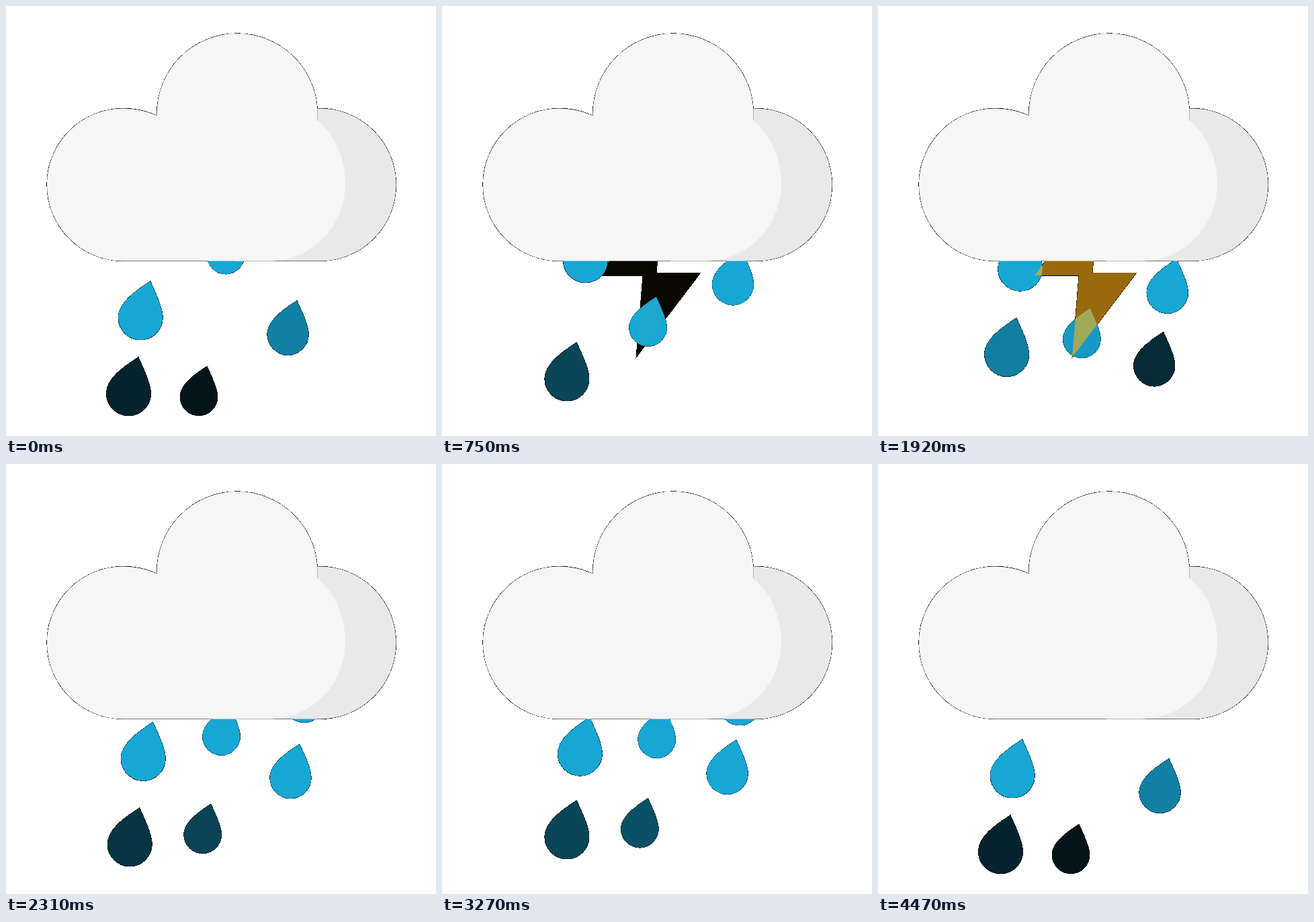
Animation, 640 px wide and 640 px high, one loop 4.5 s. Source, as an HTML page:

```html
<!DOCTYPE html>
<html lang="en">
<head>
<meta charset="utf-8">
<title>Rain cloud</title>
<style>
  html, body { margin: 0; width: 100%; height: 100%; overflow: hidden; background: #fff; }
  svg { display: block; width: 100vw; height: 100vh; }
</style>
</head>
<body>
<svg viewBox="0 0 640 640">
  <defs>
    <path id="drop" d="M14.5-53C22-36 33-14 33 1A33 33 0 0 1-33 1C-33-21-8-38.5 14.5-53Z"/>
    <path id="bolt" d="M280 338L233 401H299L289 523L385 397H319L325 338Z"/>
    <path id="shade" d="M340 379.6H467A113.6 113.6 0 0 0 580.6 266A113.6 113.6 0 0 0 467 152.4H463.4V180L340 300Z"/>
    <path id="light" d="M174.5 152.4A113.6 113.6 0 0 0 60.9 266A113.6 113.6 0 0 0 174.5 379.6H391C455 379.6 505 328 505 264C505 228 490 192 463.4 170V152.4A119.7 119.7 0 0 0 344 40.8A119.7 119.7 0 0 0 224.5 163Q201 152.4 174.5 152.4Z"/>
  </defs>
  <!-- hard black silhouettes show as a hairline around the smooth fills -->
  <g stroke="#000" shape-rendering="crispEdges">
    <use href="#shade"/>
    <use href="#light"/>
    <use id="boltBack" href="#bolt"/>
    <g id="dropBacks"></g>
  </g>
  <g id="dropFills"></g>
  <use id="boltLight" href="#bolt" fill="#ffb217"/>
  <use href="#shade" fill="#e9e9e9"/>
  <use href="#light" fill="#f6f6f6"/>
</svg>
<script>
const STEP = 30, STEPS = 150;
const $ = id => document.getElementById(id);

// Waves of three drops; the time in a wave is counted from its beat.
const beats = [-31, 0, 49, 84, 118, 149];

// x, y: circle bottom at the beat; v: fall per step; lean: sideways drift.
// Before step "turn" the fall speed is v0; fade runs over [from, to].
const columns = [
  { x: 200.2, y: 497, r: 33.1, v: 3.64, lean: .157, turn: -22.6, v0: 2.05, fade: [8, 37] },
  { x: 287, y: 610, r: 28, v: 4.3, lean: .19, turn: -60, v0: 4.3, fade: [-22, 3] },
  { x: 419.6, y: 519.7, r: 30.8, v: 3.1, lean: .18, turn: -34, v0: 4.2, fade: [-6.8, 22.5] }
];

const flashes = [24, 59.5], flashLength = 16;

function addDrop(parent) {
  const node = document.createElementNS("http://www.w3.org/2000/svg", "use");
  node.setAttribute("href", "#drop");
  return $(parent).appendChild(node);
}

const drops = beats.flatMap(beat => columns.map(col => (
  { beat, col, back: addDrop("dropBacks"), fill: addDrop("dropFills") }
)));

const clamp = v => Math.max(0, Math.min(1, v));
const show = (node, on) => { node.style.display = on ? "" : "none"; };

function drawDrop({ beat, col, back, fill }, n) {
  const s = n - beat;
  const light = clamp((col.fade[1] - s) / (col.fade[1] - col.fade[0]));
  const shown = s > -60 && light > 0;
  show(back, shown);
  show(fill, shown);
  if (!shown) return;
  const fall = col.v * Math.max(s, col.turn) + col.v0 * Math.min(0, s - col.turn);
  const x = col.x - col.lean * fall, y = col.y + fall - col.r - 1;
  const place = `translate(${x} ${y}) scale(${col.r / 33})`;
  back.setAttribute("transform", place);
  fill.setAttribute("transform", place);
  fill.setAttribute("fill", `rgb(${[23, 167, 213].map(c => Math.round(c * light))})`);
}

function drawBolt(n) {
  const start = flashes.find(f => n > f && n < f + flashLength);
  const on = start !== undefined;
  show($("boltBack"), on);
  show($("boltLight"), on);
  if (on) $("boltLight").setAttribute("opacity", Math.sin(Math.PI * (n - start) / flashLength) ** 2);
}

function draw(ms) {
  const n = Math.floor(ms / STEP) % STEPS;
  drops.forEach(d => drawDrop(d, n));
  drawBolt(n);
}

const begin = performance.now();
function tick() {
  draw(performance.now() - begin);
  requestAnimationFrame(tick);
}
tick();
</script>
</body>
</html>
```
